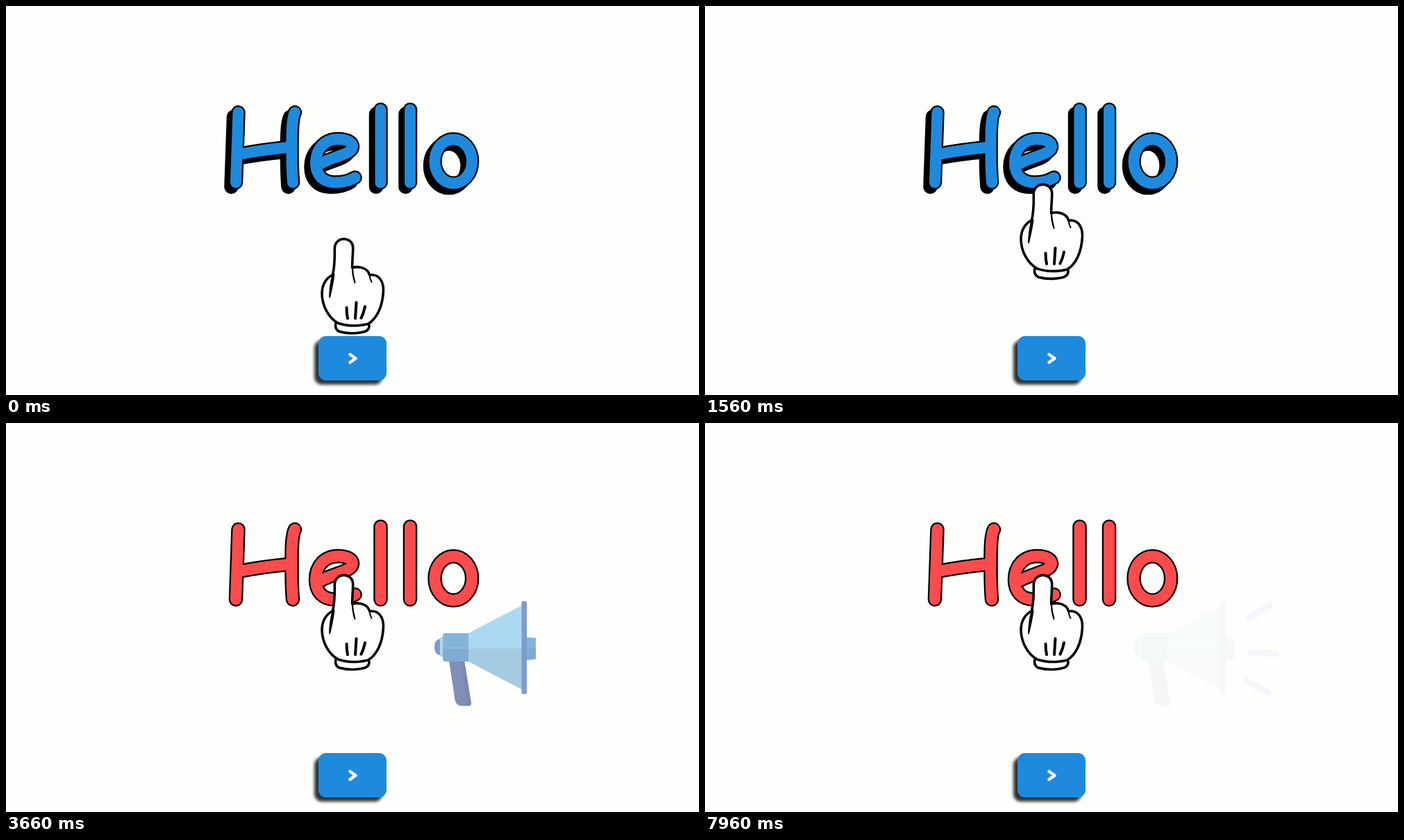
An HTML page for the animation above (8000 ms loop, 998 by 561 pixels).

```html
<!DOCTYPE html>
<html lang="en">
<head>
<meta charset="utf-8">
<title>Hello</title>
<style>
  html, body { margin: 0; width: 100%; height: 100%; overflow: hidden; background: #fefefc; }
  svg { display: block; width: 100%; height: 100%; }
  .round { fill: none; stroke-linecap: round; stroke-linejoin: round; }
</style>
</head>
<body>
<svg viewBox="0 0 998 561" role="img" aria-label="Hello">
  <defs>
    <g id="letters">
      <path d="M334.5 153.5L331 254.5"/>
      <path d="M416 153.5C411 162 411.5 190 411.5 210Q411.5 235 413 254.5"/>
      <path d="M333 214.5Q370 207 411 203.5"/>
      <path d="M502.500 247.500Q491 254.500 474 254.500C456 254.500 446 243 446 226C446 206 459 192 478 192C492 192 499 197 499 203C499 214 470 217 452 228"/>
      <path d="M539.5 149.500V254.500"/>
      <path d="M582 149.500V254.500"/>
      <ellipse cx="644.300" cy="224" rx="26.800" ry="31.800"/>
    </g>
    <filter id="soft" x="-10%" y="-10%" width="120%" height="120%"><feGaussianBlur stdDeviation="0.6"/></filter>
    <filter id="blur" x="-20%" y="-20%" width="140%" height="140%"><feGaussianBlur stdDeviation="2.2"/></filter>
    <linearGradient id="edge" gradientUnits="userSpaceOnUse" x1="0" x2="24" y1="0" y2="0">
      <stop offset="0" stop-color="#fff"/><stop offset="1" stop-color="#000"/>
    </linearGradient>
    <mask id="wipe" maskUnits="userSpaceOnUse" x="760" y="240" width="90" height="180">
      <rect x="760" y="240" width="90" height="180" fill="url(#edge)"/>
    </mask>
    <g id="rayLines">
      <path d="M783 281L814 262M784.500 330.500L821 333M778.500 370.500L811 388.500"/>
    </g>
  </defs>

  <rect width="998" height="561" fill="#fefefc"/>

  <g id="shadow" class="round" stroke="#000" stroke-width="20.500" filter="url(#soft)">
    <use href="#letters" x="-6.500" y="6.300"/>
  </g>
  <use href="#letters" class="round" stroke="#000" stroke-width="20.500"/>
  <use id="face" href="#letters" class="round" stroke-width="16"/>

  <rect x="444" y="482" width="98" height="64" rx="11" fill="#000" opacity=".8" filter="url(#blur)"/>
  <rect x="450" y="476" width="98" height="64" rx="11" fill="#1e8ade"/>
  <path class="round" d="M495.500 502.500L503.500 508.200L495.500 514" stroke="#fff" stroke-width="4.400"/>

  <g id="horn">
    <path d="M638 343H660L670 404Q670 408 666 408H657Q648 408 646.500 399Z" fill="#445a98"/>
    <path d="M655 343H660L670 404Q670 408 666 408H664Z" fill="#3d5090"/>
    <path d="M626 311V335Q617 334 617 323Q617 312 626 311Z" fill="#3f6db5"/>
    <rect x="625" y="309" width="5" height="28" fill="#85c8ee"/>
    <path d="M666 303H633Q629 303 629 308V324.500H666Z" fill="#4a90cc"/>
    <path d="M666 344H633Q629 344 629 339V324.500H666Z" fill="#4285be"/>
    <path d="M666 303L744 262.500V324.500H666Z" fill="#85c8ee"/>
    <path d="M666 344L744 385V324.500H666Z" fill="#7bb3d8"/>
    <path d="M750 309L763 310V325H750Z" fill="#4a90cc"/>
    <path d="M750 342L763 340.500V325H750Z" fill="#4285be"/>
    <rect x="742.500" y="257" width="7.500" height="134" rx="2.500" fill="#3f6db5"/>
  </g>

  <g id="rays"><g mask="url(#wipe)">
    <use href="#rayLines" x="3" y="4" class="round" stroke="#000" stroke-width="8" opacity=".25" filter="url(#blur)"/>
    <use href="#rayLines" class="round" stroke="#3f55ff" stroke-width="9"/>
  </g></g>

  <g id="hand" stroke="#000" stroke-width="3.600" stroke-linecap="round" stroke-linejoin="round" fill="#fff">
    <path d="M475.500 456C473.500 461 474.500 467 480 469.500Q498 474.500 517 469.500C523 467 524 462 522 458Z"/>
    <path d="M470.500 387.500C473.500 375 473.500 362 473.300 350C473.300 331.500 499.500 331.500 499.700 349C499.700 360 498.300 368 498.700 377.500C508 374.500 521.500 378 523.500 388C537 386 544.500 397 543.300 413C542 434 534 451 521.500 458.500Q498 464 478.500 457.500C465 450 455 433 455 414C455.500 401 462 392 470.500 387.500Z"/>
    <path d="M470.500 387.500Q466.500 402 466 420Q470.500 402 472.500 387M498.700 377Q499 389 502.500 399Q499.500 388 498.700 377M523.500 388Q524 394 526.500 398" fill="#000" stroke-width="2"/>
    <path d="M490.500 435Q490.500 444 492 450.500M504.500 427.500L503 450.500M517 433.500Q515 443 511.500 450" fill="none" stroke-width="4"/>
  </g>
</svg>
<script>
  const LOOP = 8000;
  const BLUE = [30, 138, 222], RED = [255, 75, 75];
  const get = id => document.getElementById(id);
  const [shadow, face, horn, rays, edge, hand] =
    ['shadow', 'face', 'horn', 'rays', 'edge', 'hand'].map(get);

  const progress = (t, start, end) => Math.min(1, Math.max(0, (t - start) / (end - start)));
  const mix = (a, b, k) => a + (b - a) * k;

  // Cubic bezier easing with control points (.39, 0) and (.5, 1), solved by bisection.
  function ease(x) {
    let lo = 0, hi = 1;
    for (let i = 0; i < 22; i++) {
      const u = (lo + hi) / 2, v = 1 - u;
      if (3 * u * v * v * 0.39 + 3 * u * u * v * 0.5 + u ** 3 < x) lo = u;
      else hi = u;
    }
    return lo * lo * (3 - 2 * lo);
  }

  function render(t) {
    hand.setAttribute('transform', `translate(0 ${-116.5 * ease(progress(t, 1000, 2000))})`);

    const tint = progress(t, 2350, 2950);
    face.setAttribute('stroke', `rgb(${BLUE.map((c, i) => Math.round(mix(c, RED[i], tint)))})`);
    shadow.setAttribute('opacity', 1 - tint);

    const fadeOut = 1 - progress(t, 7000, 8000);
    horn.setAttribute('opacity', progress(t, 2990, 3990) * fadeOut);
    rays.setAttribute('opacity', fadeOut);
    edge.setAttribute('gradientTransform', `translate(${mix(750, 832, progress(t, 3900, 4500))} 0)`);
  }

  const begin = performance.now();
  function tick() {
    render((performance.now() - begin) % LOOP);
    requestAnimationFrame(tick);
  }
  render(0);
  requestAnimationFrame(tick);
</script>
</body>
</html>
```
